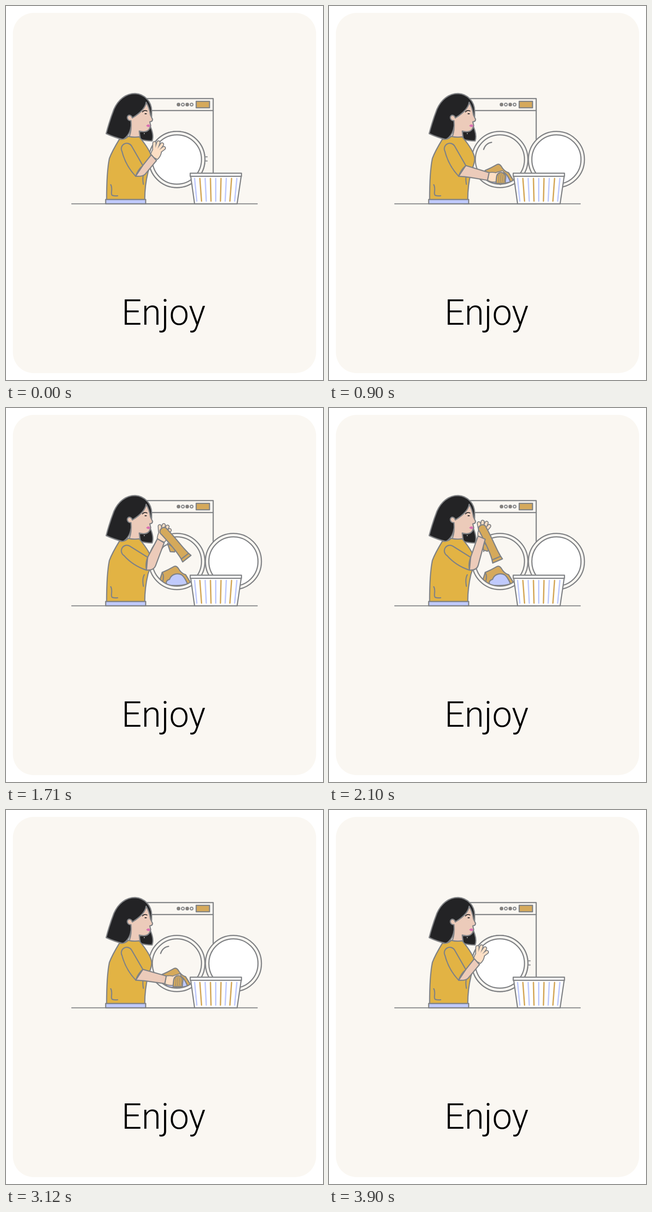
An HTML page for the animation above (3.99 s loop, 690x812 px).

```html
<!DOCTYPE html>
<html lang="en">
<head>
<meta charset="utf-8">
<title>Enjoy</title>
<style>
  html, body { margin: 0; width: 100%; height: 100%; overflow: hidden; background: #fff; }
  svg { display: block; }
  .ink { stroke: #808285; stroke-width: 2.5; stroke-linejoin: round; stroke-linecap: round; }
  .none { fill: none; }
  .paper { fill: #faf7f2; }
  .white { fill: #fff; }
  .gold { fill: #d5a95b; }
  .shirt { fill: #e2b344; }
  .blue { fill: #c0cafc; }
  .hair { fill: #232325; }
  .skin { fill: #eccbba; }
  .palm { fill: #fddfc5; }
  .dark { fill: none; stroke: #232325; stroke-width: 1.8; }
  text { font: 300 77px Roboto, "Open Sans", sans-serif; }
</style>
</head>
<body>
<svg width="690" height="812" viewBox="0 0 690 812">
  <defs><clipPath id="drum"><circle cx="372" cy="333.3" r="53.5"/></clipPath></defs>
  <rect class="paper" x="15" y="15" width="660" height="782" rx="45"/>
  <text x="251.5" y="692">Enjoy</text>

  <g class="ink paper">
    <path d="M143 429.5H547" stroke-width="2"/>
    <rect x="293" y="201" width="158" height="228.5"/>
    <path d="M293 227H451"/>
    <g id="knobs" stroke-width="2"></g>
    <rect class="gold" x="414" y="207" width="29" height="14"/>
    <path d="M429 327.5H438M429 336.5H438" stroke-width="2"/>
    <circle cx="372" cy="333.3" r="61"/>
    <g clip-path="url(#drum)">
      <path class="gold" d="M334 376L340 357Q352 352 364 345Q370 341 375 348Q381 359 391 362L403 381L390 390H340Z"/>
      <path class="none" d="M340 357Q345 365 341 377"/>
      <path class="blue" d="M350 384Q346 375 356 372C360 360 373 358 382 362Q389 367 395 382Q375 388 350 384Z"/>
    </g>
    <circle class="none" cx="372" cy="333.3" r="53.5"/>
    <path class="none" d="M336.5 311.5Q341 298 354 296"/>
  </g>

  <g id="door" class="ink">
    <circle class="paper" r="61"/>
    <circle class="white" r="53.5"/>
  </g>

  <g class="ink white">
    <path d="M402 369L410.5 429.5H503L512 369Z"/>
    <rect x="401" y="363" width="111.5" height="6.8"/>
    <g id="stripes" stroke-width="3"></g>
  </g>

  <g class="ink">
    <path class="hair" d="M290 268V289Q304 293 318 293Q323 280 313 259Z"/>
    <path class="hair" d="M218 277Q225 250 235 224C244 204 260 190 281 190C302 191 317 208 317 228V240L290 262H272Q270 280 255 290Q235 285 218 277Z"/>
    <path class="skin" d="M305 209Q312 220 314.500 237L319 246Q319 251 313 251.500L315 260L312 267Q306 276 290 271.500L292 287H266Q274 276 272 249C264 250 261 239 268 237Q273 237 275 243Q303 226 305 209Z"/>
    <path class="dark" d="M297 230Q301 225 307 228M302.500 234H305.500"/>
    <path d="M305 260Q310 254 314.500 260Q311 266 305 260Z" fill="#d970b0" stroke="none"/>
    <circle cx="301" cy="277" r="1.2" fill="#aaa" stroke="none"/>
    <rect class="blue" x="217" y="420" width="87" height="9.5"/>
    <path class="shirt" d="M247 289Q231 315 225 331Q219 360 219 420H302Q302 390 309 361C312 350 318 342 317 330Q315 314 290 284Q278 286 266 283Q259 291 247 289Z"/>
    <path class="none" d="M228 388C233 396 227 408 231 411Q236 413 243 412M299 387Q296 371 301 362"/>
  </g>

  <g class="ink">
    <g id="hand"></g>
    <g id="cloth">
      <path id="tail" class="gold" d="M4 34L5 53L14 56L18 50Z"/>
      <path id="fabric" class="gold"/>
      <path id="cuff" class="none"/>
      <g id="ribs" class="none" stroke-width="1"></g>
    </g>
    <path id="forearm" class="skin"/>
    <path id="sleeve" class="shirt"/>
  </g>
</svg>
<script>
const LOOP = 3990;
const $ = id => document.getElementById(id);
const set = (id, name, value) => $(id).setAttribute(name, value);
const mix = (a, b, k) => a + (b - a) * k;
const ramp = (t, from, to) => Math.min(1, Math.max(0, (t - from) / (to - from)));
const cubic = u => u < .5 ? 4 * u ** 3 : 1 - 4 * (1 - u) ** 3;
const sine = u => (1 - Math.cos(Math.PI * u)) / 2;
const hump = u => Math.sin(Math.PI * u);
const rad = deg => deg * Math.PI / 180;
const polar = ([x, y], r, deg) => [x + r * Math.cos(rad(deg)), y + r * Math.sin(rad(deg))];
const middle = (a, b) => [(a[0] + b[0]) / 2, (a[1] + b[1]) / 2];
const repeat = (n, make) => Array.from({ length: n }, (_, i) => make(i));

const SHOULDER = [263, 310];

// Arm state: raise of the elbow, angle and length of the forearm, bend of the
// hand against it, and how far the cloth hangs open and swings.
const reach = q => ({ raise: 0, angle: mix(-42, 12, q), length: 43 + 15 * q * q,
  bend: mix(20, 2, q), open: 0, swing: 0 });

function armAt(t) {
  if (t < 1000) return reach(sine(ramp(t, 120, 530)));
  if (t >= 3150) return reach(1 - sine(ramp(t, 3150, 3900)));
  const lift = cubic(ramp(t, 1000, 1710));
  const u = ramp(t, 1710, 2100), sniff = sine(u);
  const lower = sine(ramp(t, 2760, 3150)), raise = lift * (1 - lower);
  return {
    raise,
    angle: mix(12, mix(-59, -66, sniff), raise),
    length: 58 + 4 * sniff * raise + 13 * hump(u),
    bend: mix(2, 9, raise),
    open: sine(ramp(t, 1000, 1450)) * (1 - sine(ramp(t, 2760, 3030))),
    swing: -15 * lift * (1 - sniff) - 28 * hump(lift) + 20 * hump(lower)
  };
}

function drawDoor(t) {
  const s = 2 * (cubic(ramp(t, 265, 809)) - cubic(ramp(t, 3307, 3847))) - 1;
  const sx = Math.abs(s) < .01 ? .01 : s;
  set('door', 'transform',
    `translate(${433.5 + 61.5 * s} 333.3) scale(${sx} ${.9 + .1 * s ** 4})`);
}

function drawArm({ raise, angle, length, bend }) {
  const elbow = [mix(290, 307, raise), mix(358, 338, raise)];
  const wrist = polar(elbow, length, angle);
  const axis = Math.atan2(elbow[1] - SHOULDER[1], elbow[0] - SHOULDER[0]) * 180 / Math.PI;
  const hem = axis - 27;
  const inner = polar(elbow, 14, hem - 90), outer = polar(elbow, 14, hem + 90);
  const front = polar(SHOULDER, 12, axis - 90), back = polar(SHOULDER, 12, axis + 90);
  const bulge = polar(middle(back, outer), 8, axis + 90);
  set('sleeve', 'd', `M${inner}L${front}A12 12 0 0 0 ${back}Q${bulge} ${outer}Q${polar(elbow, -4, hem)} ${inner}Z`);

  const near = polar(wrist, 8.5, angle - 90), far = polar(wrist, 8.5, angle + 90);
  const tip = [outer[0] + 16, outer[1] + 1];
  const turn = [mix(tip[0], far[0], .17), mix(tip[1], far[1], .17)];
  set('forearm', 'd', `M${inner}L${near}L${far}L${turn}Q${tip} ${outer}Z`);

  set('hand', 'transform', `translate(${wrist}) rotate(${angle - bend})`);
  return polar(polar(wrist, 25, angle - bend), 8, angle - bend - 90);
}

// A ribbon of even width along a curved spine, flaring a little at its end.
function drawCloth([x, y], { open, swing }, shown) {
  const cx = mix(1, 17, open), cy = mix(11, 32, open);
  const ex = mix(1, 36, open), ey = mix(19, 77, open);
  const edge = (s, side) => {
    const px = 2 * (1 - s) ** 2 + 2 * s * (1 - s) * cx + s * s * ex;
    const py = 5 * (1 - s) ** 2 + 2 * s * (1 - s) * cy + s * s * ey;
    const dx = (1 - s) * (cx - 2) + s * (ex - cx), dy = (1 - s) * (cy - 5) + s * (ey - cy);
    const w = side * (mix(10, 8.5, open) + 3 * open * s ** 8) / Math.hypot(dx, dy);
    return [px - dy * w, py + dx * w];
  };
  const left = repeat(13, i => edge(i / 12, 1)), right = repeat(13, i => edge(1 - i / 12, -1));
  set('fabric', 'd', `M${left.join('L')}L${right.join('L')}A9 9 0 0 0 ${left[0]}Z`);
  set('cuff', 'd', `M${edge(.93, 1)}L${edge(.93, -1)}`);
  set('cloth', 'transform', `translate(${x} ${y}) rotate(${swing})`);
  set('cloth', 'visibility', shown ? 'visible' : 'hidden');
  set('tail', 'opacity', ramp(open, .8, 1));
  set('cuff', 'opacity', ramp(open, .8, 1));
  set('ribs', 'opacity', 1 - ramp(open, 0, .3));
}

function draw(t) {
  const arm = armAt(t);
  drawDoor(t);
  drawCloth(drawArm(arm), arm, t >= 690 && t < 3150);
}

// Fingers fan out: wide grey strokes below the palm, narrower skin strokes above.
const fingers = (color, width) => repeat(4, i => {
  const from = polar([4, -2], 15, -26 + 17 * i), to = polar([4, -2], 27 + 3.5 * hump(i / 3), -26 + 17 * i);
  return `<path d="M${from}L${to}" stroke="${color}" stroke-width="${width}"/>`;
}).join('');
$('hand').innerHTML = fingers('#808285', 9)
  + '<path class="palm" d="M0 -8.500Q10 -12 18 -10Q25 0 18 9Q8 12 0 8.500Z" stroke-width="2"/>'
  + fingers('#fddfc5', 5);

$('knobs').innerHTML = repeat(4, i =>
  `<circle cx="${375.5 + 9.5 * i}" cy="214" r="3" ${i % 2 ? '' : 'fill="#8c8274"'}/>`).join('');
$('stripes').innerHTML = repeat(9, i =>
  `<path d="M${410.5 + 11.5 * i} 374.5L${415.3 + 10.3 * i} 423.5" stroke="${i % 2 ? '#d5a95b' : '#c0cafc'}"/>`).join('');
$('ribs').innerHTML = repeat(4, i => `<path d="M${4 * i - 5} -2q4 11 0 21"/>`).join('');

const start = performance.now();
function tick() {
  draw((performance.now() - start) % LOOP);
  requestAnimationFrame(tick);
}
tick();
</script>
</body>
</html>
```
